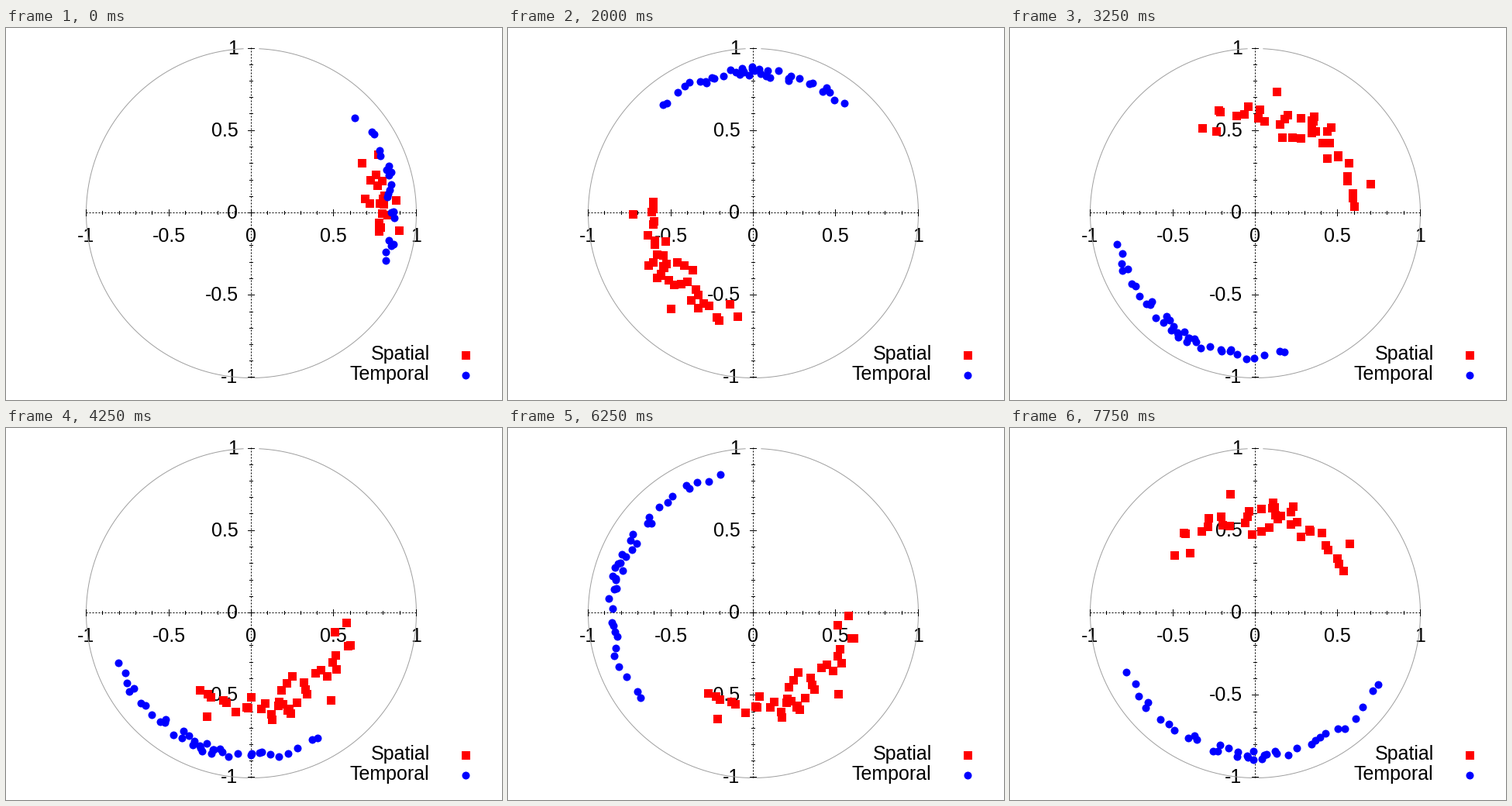
Recreate the animation shown at these times as a matplotlib script. Size 640 px wide and 480 px high, loop 8000 ms.

```python
import numpy as np
import matplotlib.pyplot as plt
from matplotlib.animation import FuncAnimation

W, H, DPI = 640, 480, 100
PX = 72 / DPI                    # one pixel in points
CX, CY, R = 316.5, 238.5, 213
FRAMES, INTERVAL = 32, 250
COUNT, START = 38, 21            # markers per series, markers at the start

plt.rcParams["font.family"] = "Liberation Sans"

# Path of each group's middle: (frame, degrees), turns kept continuous
SPATIAL_PATH = [(0, 9), (8, 216), (13, 422), (17, 654),
                (21, 944), (28, 1074), (31, 1164)]
TEMPORAL_PATH = [(0, 12), (2.5, -52), (5, -25), (8, 90), (10, 172),
                 (13, 237), (15, 224), (17, 249), (21, 451),
                 (25, 520), (28, 518), (31, 267)]

rng = np.random.default_rng(7)
# markers gather near the middle of the arc and thin out to its ends
u = np.linspace(-1, 1, COUNT)
SLOT = u * np.abs(u) ** .4
# every second slot first, so a partial set still covers the whole arc
ORDER = np.r_[0:COUNT:2, 1:COUNT:2]
TURN_S, TURN_T = rng.normal(0, 2.5, (2, COUNT))
RING_S = np.clip(rng.normal(0, .065, COUNT), -.13, .13)
RING_T = rng.normal(0, .017, COUNT)


def along(path, frame):
    return np.interp(frame, *zip(*path))


def spatial_radius(frame):
    """Shrinks quickly at first, with one dip later in the loop."""
    return .61 + .19 * np.exp(-frame / 4) - .19 * np.exp(-((frame - 21) / 3) ** 2)


def to_pixels(deg, rad):
    """Polar position, moved to the centre of its pixel."""
    a = np.radians(deg)
    x, y = CX + R * rad * np.cos(a), CY - R * rad * np.sin(a)
    return np.floor(x) + .5, np.floor(y) + .5


fig = plt.figure(figsize=(W / DPI, H / DPI), dpi=DPI, facecolor="white")
ax = fig.add_axes([0, 0, 1, 1])
ax.set_xlim(0, W)
ax.set_ylim(H, 0)
ax.axis("off")


def line(x, y, color="black", **kw):
    ax.plot(x, y, color=color, lw=PX, zorder=2, **kw)


def label(x, y, text, ha):
    ax.text(x, y, text, ha=ha, va="baseline", fontsize=18, zorder=1)


def markers(x, y, shape, color, size, z):
    return ax.plot(x, y, shape, color=color, ms=size * PX, mew=0,
                   snap=False, zorder=z)[0]


def draw_axes():
    a = np.radians(np.linspace(92.8, 447.2, 720))
    line(CX + R * np.cos(a), CY + .5 - 212.5 * np.sin(a), "#a0a0a0")
    # whole coordinates snap to the middle of that pixel
    x0, y0 = int(CX), int(CY)
    line([x0 - R, x0 + R], [y0, y0], ls=(0, (2, 2)), snap=True)
    line([x0, x0], [y0 - R, y0 + R], ls=(0, (2, 2)), snap=True)
    for i in range(-10, 11):
        half = 4 if i % 5 == 0 else 2
        x, y = x0 + round(R * i / 10), y0 - round(212.5 * i / 10)
        line([x, x], [y0 - half, y0 + half], snap=True)
        line([x0 - half, x0 + half], [y, y], snap=True)
        if i % 5 == 0:
            text = f"{i / 10:g}"
            label(x, 276, text, "center")
            label(299.5, y + 8, text, "right")


def draw_legend():
    label(547, 428, "Spatial", "right")
    label(546, 454, "Temporal", "right")
    markers([592.5], [421.5], "s", "red", 11, 3)
    markers([592.5], [447.5], "o", "blue", 10, 4)


draw_axes()
draw_legend()
spatial = markers([], [], "s", "red", 11, 3)
temporal = markers([], [], "o", "blue", 10, 4)


def update(frame):
    shown = ORDER[:min(COUNT, START + 3 * frame)]

    spread = min(58, 17 + 3.2 * frame)
    x, y = to_pixels(along(SPATIAL_PATH, frame) + spread * SLOT + TURN_S,
                     spatial_radius(frame) + RING_S)
    spatial.set_data(x[shown], y[shown])

    spread = 30 + frame
    x, y = to_pixels(along(TEMPORAL_PATH, frame) + spread * SLOT + TURN_T,
                     .862 + RING_T)
    temporal.set_data(x[shown], y[shown])
    return spatial, temporal


anim = FuncAnimation(fig, update, frames=FRAMES, interval=INTERVAL,
                     repeat=True, repeat_delay=0)
plt.show()
```
